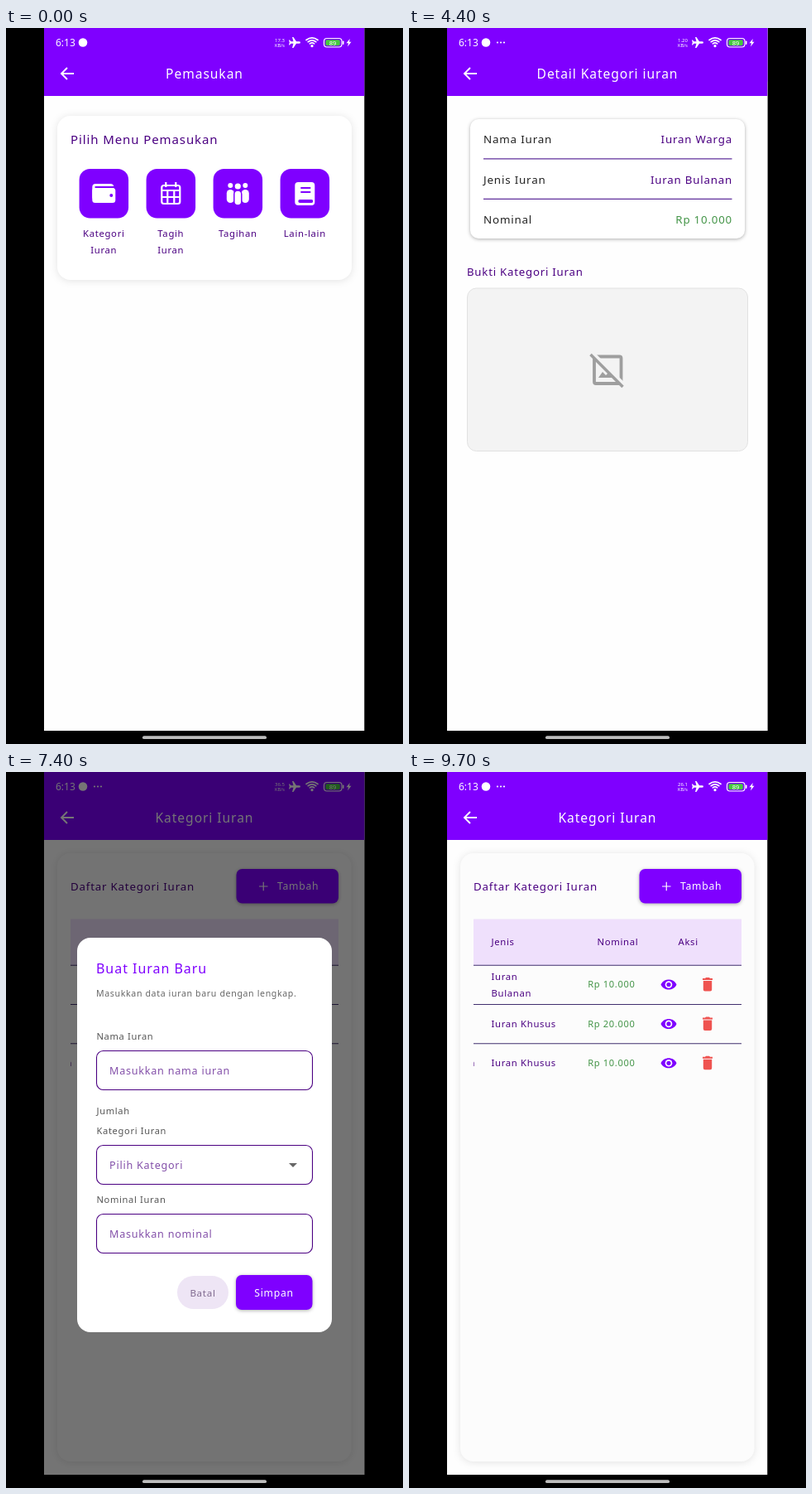
Animation, 480 px wide and 864 px high, one loop 9800 ms. Source, as an HTML page:

```html
<!DOCTYPE html>
<html lang="id">
<head>
<meta charset="utf-8">
<title>Pemasukan</title>
<style>
  html, body { margin: 0; height: 100%; overflow: hidden; background: #000; }
  svg { display: block; width: 100vw; height: 100vh; }
  text { font-family: "Noto Sans", "Open Sans", sans-serif; font-weight: 500; letter-spacing: .06em; white-space: pre; }
  .status text { letter-spacing: 0; }
  .soft { filter: drop-shadow(0 1px 5px #0000001c); }
  .raised { filter: drop-shadow(0 1px 2px #00000050); }
</style>
</head>
<body>
<svg id="stage" viewBox="0 0 480 864"></svg>
<script>
const PURPLE = '#7f00ff', INDIGO = '#4b0082', GREEN = '#439447', RED = '#ef5350', GRAY = '#9e9e9e';
const LOOP = 9800, MAX_SCROLL = 169;

// Markup helpers; text is centred vertically on y.
const text = (x, y, size, str, fill = INDIGO, anchor = 'start', extra = '') =>
  `<text x="${x}" y="${y + size * .357}" font-size="${size}" fill="${fill}" text-anchor="${anchor}" ${extra}>${str}</text>`;
const rect = (x, y, w, h, r, fill, extra = '') =>
  `<rect x="${x}" y="${y}" width="${w}" height="${h}" rx="${r}" fill="${fill}" ${extra}/>`;
const path = (d, fill, extra = '') => `<path d="${d}" fill="${fill}" ${extra}/>`;
const line = (d, color, width, extra = '') => path(d, 'none', `stroke="${color}" stroke-width="${width}" ${extra}`);
const circle = (x, y, r, fill) => `<circle cx="${x}" cy="${y}" r="${r}" fill="${fill}"/>`;
const at = (x, y, body) => `<g transform="translate(${x} ${y})">${body}</g>`;

const page = (id, title, body) => `<g id="${id}">
  ${rect(46, 0, 387.5, 848, 0, '#fefefe')}${rect(46, 0, 387.5, 82, 0, PURPLE)}
  ${line('M82 55H67.500M74 48L67 55L74 62', '#fff', 1.9)}
  ${text(240, 55.5, 15.6, title, '#fff', 'middle')}${body}</g>`;

// Icons, drawn around their own centre.
const icons = {
  wallet: rect(-14, -12, 26, 20, 4, '#fff') + rect(-11, -9, 25, 2, 1, PURPLE) +
    rect(-14, -7, 28, 18, 3.5, '#fff') + circle(9, 2, 2, PURPLE),
  calendar: rect(-11, -10, 22, 22, 2.5, 'none', 'stroke="#fff" stroke-width="2.2"') +
    line('M-6 -14V-8M6 -14V-8M-11 -4H11M-11 4H11M-4 -4V12M4 -4V12', '#fff', 2.2),
  people: [[-9, 3], [9, 3], [0, 3.6]].map(([x, r]) =>
    circle(x, x ? -10 : -9, r, '#fff') +
    rect(x - 4.5, x ? -5 : -4, 9, x ? 16 : 18, 4.5, '#fff', x ? '' : `stroke="${PURPLE}" stroke-width="1.5"`)).join(''),
  book: rect(-12, -14, 24, 28, 4, '#fff') + rect(-8, 7, 18, 4, 2, PURPLE) +
    line('M-5 -7H7M-5 -2H7', PURPLE, 2),
  eye: path('M-9.500 0C-6 -8 6 -8 9.500 0C6 8 -6 8 -9.500 0Z', PURPLE) + circle(0, 0, 4.3, '#fff') + circle(0, 0, 2.6, PURPLE),
  trash: path('M-6 -7.500H-3L-2 -8.500H2L3 -7.500H6V-5.500H-6ZM-5.200 -4.500H5.200V6Q5.200 8 3.200 8H-3.200Q-5.200 8 -5.200 6Z', RED)
};

const menuItem = ([icon, ...label], i) => {
  const x = 118.3 + 81 * i;
  return rect(x - 29.7, 170, 59.5, 59.5, 13, PURPLE) + at(x, 200, icons[icon]) +
    label.map((word, k) => text(x, 247.5 + 20 * k, 11.3, word, INDIGO, 'middle')).join('');
};
const menu = page('menu', 'Pemasukan',
  rect(62, 106, 356, 198, 16, '#fff', 'class="soft"') +
  text(78, 135, 15, 'Pilih Menu Pemasukan') +
  [['wallet', 'Kategori', 'Iuran'], ['calendar', 'Tagih', 'Iuran'],
   ['people', 'Tagihan'], ['book', 'Lain-lain']].map(menuItem).join(''));

const cell = (x, y, words) => words.map((w, i) =>
  text(x, y + 20 * (i - (words.length - 1) / 2), 11.3, w)).join('');
const row = ([name, type, amount], i) => {
  const y = 256.5 + 47.4 * i;
  return text(90, y, 11.3, i + 1) + cell(157, y, name) + cell(268.5, y, type) +
    text(442.5, y, 11.1, 'Rp ' + amount, GREEN, 'end') +
    at(483, y, icons.eye) + at(530, y, icons.trash);
};
const rows = [
  [['Iuran Warga'], ['Iuran', 'Bulanan'], '10.000'],
  [['Sumbangan', 'Acara'], ['Iuran Khusus'], '20.000'],
  [['Sewa Lapangan'], ['Iuran Khusus'], '10.000']
];
const heading = [[90, 'No'], [157, 'Nama'], [268.5, 'Jenis'], [396.5, 'Nominal'], [494.5, 'Aksi']];
const list = page('list', 'Kategori Iuran',
  rect(62, 98, 355.5, 734, 16, '#fcfcfc', 'class="soft"') +
  text(78, 138, 13.3, 'Daftar Kategori Iuran') +
  rect(278.5, 117, 123.5, 41.5, 7, PURPLE, 'class="raised"') +
  line('M306 138H316.500M311.250 132.750V143.250', '#fff', 1.2) +
  text(328, 138, 12.2, 'Tambah', '#fff') +
  rect(78, 177.5, 324, 55.5, 0, '#efe0fc') +
  line('M78 233.200H402M78 280.500H402M78 327.800H402', '#42306f', 1.1) +
  `<g clip-path="url(#table)"><g id="columns">
    ${heading.map(([x, label]) => text(x, 205, 11.3, label)).join('')}${rows.map(row).join('')}
  </g></g>` +
  rect(78, 812.8, 213, 4, 0, '#b5b5b5', 'id="thumb"'));

const fact = ([label, value, color], i) =>
  text(90, 134.5 + 48.3 * i, 13.4, label, '#222') + text(391, 134.5 + 48.3 * i, 13.3, value, color, 'end');
const detail = page('detail', 'Detail Kategori iuran',
  rect(74, 110, 332, 144, 10, '#fff', 'class="raised"') +
  [['Nama Iuran', 'Iuran Warga', INDIGO], ['Jenis Iuran', 'Iuran Bulanan', INDIGO],
   ['Nominal', 'Rp 10.000', GREEN]].map(fact).join('') +
  line('M90 157.800H390.500M90 206.300H390.500', '#60309c', 1.3) +
  text(70, 294.5, 13.2, 'Bukti Kategori Iuran') +
  rect(70.5, 314, 339, 196.500, 11, '#f3f3f3', 'stroke="#e2e2e2"') +
  at(240, 413, rect(-16, -16.5, 32.5, 32.5, 2, 'none', `stroke="${GRAY}" stroke-width="3.800"`) +
    path('M-11 9L-6 2L-2 6L1 3L7 9Z', GRAY) +
    line('M-18 -21L22 19', '#f3f3f3', 4) + line('M-20.500 -19L18.500 20', GRAY, 3.6)));

const field = (y, label, hint) => text(109.5, y - 17.5, 11.1, label, '#555') +
  rect(109.5, y, 261, 47, 8, 'none', `stroke="${INDIGO}" stroke-width="1.100"`) +
  text(125, y + 24, 12.6, hint, '#4b0082b0');
const dialog = `<g id="dialog">
  ${rect(86, 200, 308, 476, 16, '#fff')}
  ${text(109, 237, 16, 'Buat Iuran Baru', PURPLE)}
  ${text(109, 267.5, 10.6, 'Masukkan data iuran baru dengan lengkap.', '#666')}
  ${field(336.5, 'Nama Iuran', 'Masukkan nama iuran')}
  ${text(109.5, 409.5, 11.1, 'Jumlah', '#555')}
  ${field(450.5, 'Kategori Iuran', 'Pilih Kategori')}${path('M342 472H352L347 477Z', '#666')}
  ${field(533.5, 'Nominal Iuran', 'Masukkan nominal')}
  ${rect(207, 608, 62, 40, 20, '#eee5f5')}${text(238, 628.5, 11.6, 'Batal', '#806a90', 'middle')}
  ${rect(278, 607, 92.5, 42, 7, PURPLE, 'class="raised"')}${text(324, 628.5, 12.2, 'Simpan', '#fff', 'middle')}
</g>`;

const arc = r => `M${370 - r} ${21.5 - r}Q370 ${21.5 - r * 1.75} ${370 + r} ${21.5 - r}`;
const status = `<g class="status">
  ${text(60, 18, 12, '6:13', '#fff')}${circle(93, 17.5, 5.3, '#fff')}
  <g id="dots">${[107, 111, 115].map(x => circle(x, 17.5, 1.1, '#fff')).join('')}</g>
  ${text(331, 15, 6, '', '#fff', 'middle', 'id="speed"')}${text(331, 21.5, 5.6, 'KB/s', '#fff', 'middle')}
  ${path('M356 17.500Q356 16.300 354 16.300H351L347.500 11H346L347.500 16.300H344.500L343 14.500H342L342.800 17.500L342 20.500H343L344.500 18.700H347.500L346 24H347.500L351 18.700H354Q356 18.700 356 17.500Z', '#fff')}
  ${[7, 4.8, 2.6].map(r => line(arc(r), '#fff', 1.7, 'stroke-linecap="round"')).join('')}${circle(370, 21.7, 1.6, '#fff')}
  ${rect(384.500, 12.500, 21.500, 10.500, 3.5, 'none', 'stroke="#fff" stroke-width="1.200"')}
  ${rect(386.300, 14.300, 17.500, 7, 1.8, '#45c83f')}${rect(407, 15.500, 1.500, 4.500, .7, '#fff')}
  ${text(395, 18, 7.5, '89', '#fff', 'middle')}${path('M415.800 13L411.500 18.300H414L413 22.500L417.500 16.800H415Z', '#fff')}
</g>`;

const stage = document.getElementById('stage');
stage.innerHTML = `<defs>
  <clipPath id="phone">${rect(46, 0, 387.5, 848, 0, '#fff')}</clipPath>
  <clipPath id="table">${rect(78, 177, 324, 200, 0, '#fff')}</clipPath></defs>
  <g clip-path="url(#phone)">${menu}${list}${detail}${status}
  ${rect(46, 0, 387.5, 848, 0, '#000', 'id="barrier"')}${dialog}</g>
  ${rect(165, 854.3, 150, 3.8, 1.9, '#bdbdbd')}`;
const el = Object.fromEntries([...stage.querySelectorAll('[id]')].map(e => [e.id, e]));

const ramp = (t, from, to) => Math.min(1, Math.max(0, (t - from) / (to - from)));
const easeOut = p => 1 - (1 - p) ** 3;
const smooth = p => p * p * (3 - 2 * p);

function show(element, opacity, scale = 1) {
  element.style.display = opacity > 0 ? '' : 'none';
  element.setAttribute('opacity', opacity);
  element.setAttribute('transform', `translate(240 424) scale(${scale}) translate(-240 -424)`);
}

function render(t) {
  const open = ramp(t, 100, 400);
  const push = ramp(t, 3950, 4250);
  const pop = ramp(t, 5650, 5950);

  show(el.menu, open < 1 ? 1 : 0, 1 + .05 * easeOut(open));
  const listScale = pop > 0 ? 1.1 - .1 * easeOut(pop)
    : push > 0 ? 1 + .05 * easeOut(push) : .85 + .15 * easeOut(open);
  show(el.list, ramp(open, .125, .25), listScale);
  show(el.detail, ramp(push, .125, .25) * (1 - ramp(pop, .08, .21)),
    .85 + .15 * easeOut(push) - .1 * easeOut(pop));

  const scroll = MAX_SCROLL * smooth(ramp(t, 2750, 3750));
  el.columns.setAttribute('transform', `translate(${-scroll} 0)`);
  el.thumb.setAttribute('x', 78 + scroll * 111 / MAX_SCROLL);
  el.thumb.setAttribute('opacity', ramp(t, 2750, 2950) * (1 - ramp(t, 4350, 4650)));

  const modal = ramp(t, 6600, 6750) * (1 - ramp(t, 7672, 7822));
  show(el.barrier, .54 * modal);
  show(el.dialog, 1 - (1 - modal) ** 1.6);

  el.dots.style.display = t < 1600 ? 'none' : '';
  el.speed.textContent = t < 1600 ? '17.3' : t < 5000 ? '1.20' : t < 9600 ? '36.5' : '26.1';
}

const start = performance.now();
(function tick() {
  render((performance.now() - start) % LOOP);
  requestAnimationFrame(tick);
})();
</script>
</body>
</html>
```
